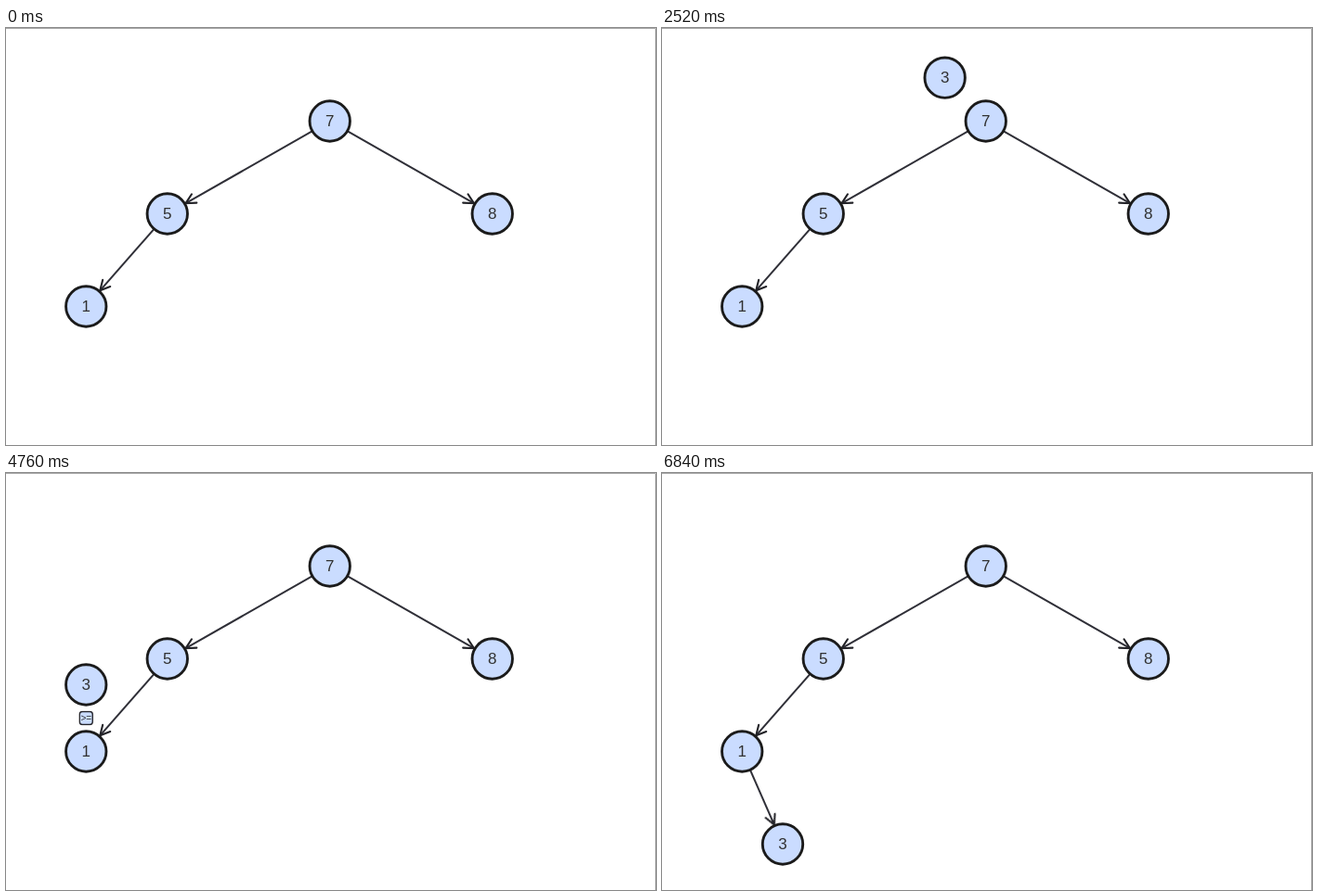
An HTML page that plays this animation: 700 by 450 pixels, repeating every 6920 ms.

```html
<!DOCTYPE html>
<html lang="en">
<head>
<meta charset="utf-8">
<title>Binary search tree insertion</title>
<style>
  html, body { margin: 0; width: 100%; height: 100%; overflow: hidden; background: #fff; }
  svg { display: block; width: 700px; height: 450px; }
  .node circle { fill: #cadcff; stroke: #1b1b1b; stroke-width: 2.9; }
  .edge { fill: none; stroke: #2f2f37; stroke-width: 2; }
  .edge .head { stroke: #222227; stroke-width: 2.1; stroke-linecap: round; }
  .badge rect { fill: #cadcff; stroke: #25252b; stroke-width: 1.4; }
  text { font-family: "Liberation Sans", Arial, sans-serif; text-anchor: middle; fill: #303030; }
  .node text { font-size: 17px; }
  .badge text { font-size: 10px; }

  .new, .badge, .late { animation: 6920ms step-end infinite; }
  .new { animation-name: enter; }
  .late { animation-name: link; }
  .b1 { animation-name: badge1; }
  .b2 { animation-name: badge2; }
  .b3 { animation-name: badge3; }
  .mover { animation: walk 6920ms linear infinite; }

  @keyframes enter { 0% { opacity: 0 } 15.0%, 100% { opacity: 1 } }
  @keyframes link { 0% { opacity: 0 } 80.8%, 100% { opacity: 1 } }
  @keyframes badge1 { 0% { opacity: 0 } 22.52% { opacity: 1 } 33.2%, 100% { opacity: 0 } }
  @keyframes badge2 { 0% { opacity: 0 } 44.45% { opacity: 1 } 53.6%, 100% { opacity: 0 } }
  @keyframes badge3 { 0% { opacity: 0 } 61.2% { opacity: 1 } 69.93%, 100% { opacity: 0 } }
  @keyframes walk {
    0%, 33.73% { transform: translate(348.75px, 28.5px) }
    44.45%, 53.55% { transform: translate(173.75px, 128.5px) }
    61.2%, 70.3% { transform: translate(86.25px, 228.5px) }
    80.35%, 100% { transform: translate(130px, 400.5px) }
  }
</style>
</head>
<body>
<svg id="stage" viewBox="0 0 700 450">
  <path d="M0 .5H699.5V450" fill="none" stroke="#a9a9a9"/>
</svg>
<script>
  const stage = document.getElementById('stage');
  const nodes = { 7: [348.75, 100.5], 5: [173.75, 200.5], 8: [523.75, 200.5], 1: [86.25, 300.5], 3: [130, 400.5] };

  function add(parent, tag, attrs, text = '') {
    const el = document.createElementNS('http://www.w3.org/2000/svg', tag);
    for (const key in attrs) el.setAttribute(key, attrs[key]);
    el.textContent = text;
    return parent.appendChild(el);
  }

  function edge(from, to, cls = '') {
    const [x1, y1] = nodes[from], [x2, y2] = nodes[to];
    const len = Math.hypot(x2 - x1, y2 - y1);
    const angle = Math.atan2(y2 - y1, x2 - x1) * 180 / Math.PI;
    const tip = len - 22.8;
    const g = add(stage, 'g', { class: 'edge ' + cls, transform: `translate(${x1} ${y1}) rotate(${angle})` });
    add(g, 'path', { d: `M22 0H${tip}` });
    add(g, 'path', { class: 'head', d: `M${tip - 10.5} -5.4L${tip} 0L${tip - 10.5} 5.4` });
  }

  function node(parent, label) {
    const g = add(parent, 'g', { class: 'node' });
    add(g, 'circle', { r: 21.7 });
    add(g, 'text', { y: 5.7 }, label);
    return g;
  }

  function badge(x, y, sign, cls) {
    const g = add(stage, 'g', { class: 'badge ' + cls, transform: `translate(${x} ${y})` });
    add(g, 'rect', { x: -7, y: -7, width: 14, height: 14, rx: 3 });
    add(g, 'text', { y: 3.5 }, sign);
  }

  edge(7, 5);
  edge(7, 8);
  edge(5, 1);
  edge(1, 3, 'late');

  for (const label of [7, 5, 8, 1])
    node(stage, label).setAttribute('transform', `translate(${nodes[label]})`);

  badge(348.75, 64.5, '<', 'b1');
  badge(173.75, 164.5, '<', 'b2');
  badge(86.25, 264.5, '>=', 'b3');

  const mover = add(add(stage, 'g', { class: 'new' }), 'g', { class: 'mover' });
  node(mover, 3);
</script>
</body>
</html>
```
